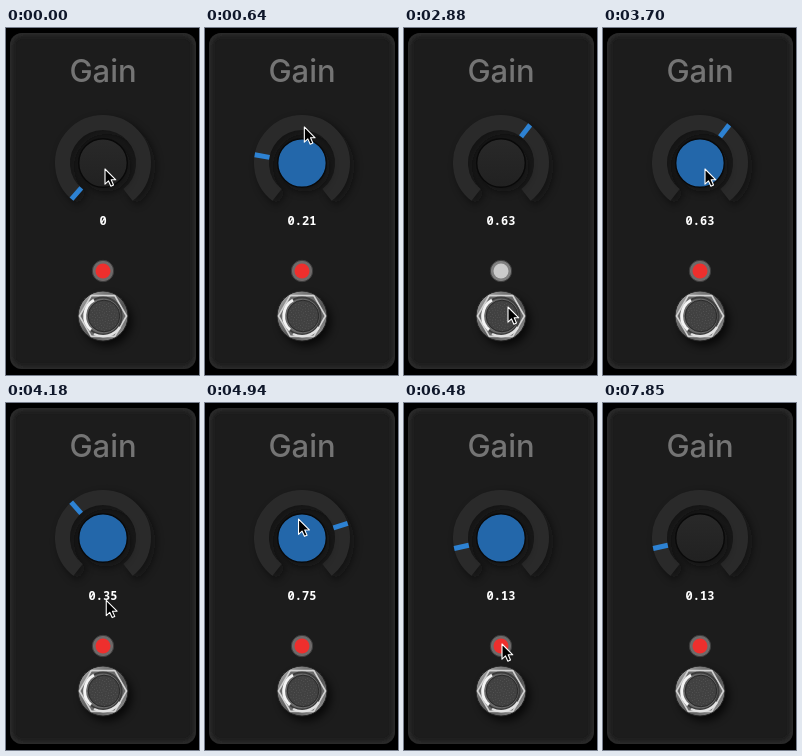
Animation, 193 px wide and 347 px high, one loop 8.36 s. Source, as an HTML page:

```html
<!DOCTYPE html>
<html lang="en">
<head>
<meta charset="utf-8">
<title>Gain pedal</title>
<style>
html, body { margin: 0; width: 100%; height: 100%; overflow: hidden; background: #000; }
svg { display: block; width: 193px; height: 347px; }
text { text-anchor: middle; }
.title { font: 450 31px Inter, sans-serif; fill: #747474; }
.value { font: 600 12px "Noto Sans Mono", monospace; fill: #fff; }
</style>
</head>
<body>
<svg viewBox="0 0 193 347">
  <defs>
    <linearGradient id="cap" x1="0" y1="0" x2="0" y2="1">
      <stop offset="0" stop-color="#292929"/><stop offset="1" stop-color="#212121"/>
    </linearGradient>
    <linearGradient id="metal" x1="0" y1="0" x2="1" y2="1">
      <stop offset="0" stop-color="#bbb"/><stop offset=".3" stop-color="#777"/>
      <stop offset=".6" stop-color="#555"/><stop offset="1" stop-color="#a5a5a5"/>
    </linearGradient>
    <filter id="soft" x="-50%" y="-50%" width="200%" height="200%"><feGaussianBlur stdDeviation="4"/></filter>
    <filter id="edge" x="-10%" y="-10%" width="120%" height="120%"><feGaussianBlur stdDeviation="2"/></filter>
    <filter id="gloss" x="-20%" y="-20%" width="140%" height="140%"><feGaussianBlur stdDeviation=".6"/></filter>
    <clipPath id="panel"><rect x="4" y="5" width="186" height="336" rx="12"/></clipPath>
  </defs>

  <rect width="193" height="347" fill="#000"/>
  <g clip-path="url(#panel)">
    <rect x="4" y="5" width="186" height="336" fill="#1c1c1c"/>
    <rect x="4" y="5" width="186" height="336" rx="12" fill="none" stroke="#2d2d2d" stroke-width="5" filter="url(#edge)"/>
  </g>
  <text class="title" x="97" y="53.7">Gain</text>

  <g transform="translate(97 135)">
    <g fill="none" stroke-width="15">
      <path class="ring" stroke="#0c0c0c" opacity=".6" transform="translate(4 4)" filter="url(#soft)"/>
      <path class="ring" stroke="#2a2a2a"/>
    </g>
    <rect id="mark" x="-2.5" y="33" width="5" height="15" fill="#2d82d3"/>
    <circle cx="3" cy="4" r="25" fill="#080808" opacity=".6" filter="url(#soft)"/>
    <circle id="knob" r="24.3" stroke="#090909" stroke-width="1.4"/>
  </g>
  <text class="value" id="value" x="97" y="196.5"></text>

  <g transform="translate(97 243)">
    <circle id="rim" r="10.7" stroke="#3c3c3c"/>
    <circle id="led" r="7.5"/>
  </g>

  <g transform="translate(97 288)">
    <circle cx="4" cy="5" r="25" fill="#000" opacity=".7" filter="url(#soft)"/>
    <circle r="25" fill="url(#metal)" stroke="#222"/>
    <g fill="none" filter="url(#gloss)">
      <path id="hex" fill="#696969" stroke="#d2d2d2" stroke-width="1.6"/>
      <circle r="18.6" stroke="#3c3c3c" stroke-width="2"/>
      <path d="M-12 14A18.5 18.5 0 0 1-9-16" stroke="#f4f4f4" stroke-width="3"/>
      <path d="M-9 18A20 20 0 0 0 17 11" stroke="#e2e2e2" stroke-width="2.5"/>
    </g>
    <circle cx="1" r="15.8" fill="#414141" stroke="#2a2a2a"/>
    <g id="grain" fill="#707070" opacity=".5"></g>
  </g>

  <path id="cursor" d="M0 0V15.2L3.5 11.9L5.9 17.2L8.5 16L6.2 10.8H10.8Z" fill="#000" stroke="#fff" stroke-width="1.1" stroke-linejoin="round"/>
</svg>
<script>
const LOOP = 8360;
const HOME = { x: 99, y: 141 };
const PEAK = .63;
const $ = id => document.getElementById(id);

// The hand eases to each point in turn and rests in between.
const moves = [
  { from: 250, to: 1260, x: 100, y: 15 },
  { from: 1260, to: 2160, x: 104, y: 279 },
  { from: 3240, to: 3620, x: 102, y: HOME.y },
  { from: 3820, to: 4280, x: 100, y: 205 },
  { from: 4380, to: 5160, x: 92, y: 95 },
  { from: 5220, to: 6440, x: 98, y: 241 },
  { from: 6700, to: 7060, x: 165, y: 215 }
];
const drags = [
  { from: 60, to: 1260, base: 0 },
  { from: 3690, to: 6640, base: PEAK }
];
const lit = t => t < 2450 || t >= 3210;

const ease = u => u * u * (3 - 2 * u);

function handAt(t) {
  let { x, y } = HOME;
  for (const m of moves) {
    const k = ease(Math.min(1, Math.max(0, (t - m.from) / (m.to - m.from))));
    x += (m.x - x) * k;
    y += (m.y - y) * k;
  }
  return { x, y };
}

// Dragging up by 200 px covers the full range.
function valueAt(t) {
  const drag = drags.filter(d => t >= d.from).pop();
  return drag ? drag.base + (HOME.y - handAt(Math.min(t, drag.to)).y) / 200 : 0;
}

function polar(radius, degrees) {
  const a = degrees * Math.PI / 180;
  return `${-radius * Math.sin(a)} ${radius * Math.cos(a)}`;
}

function build() {
  document.querySelectorAll('.ring').forEach(ring =>
    ring.setAttribute('d', `M${polar(40.5, 38)}A40.5 40.5 0 1 1 ${polar(40.5, 322)}`));
  const corners = Array.from({ length: 6 }, (_, i) => polar(23.5, 30 + 60 * i));
  $('hex').setAttribute('d', `M${corners.join('L')}Z`);

  for (let i = 0; i < 90; i++) {
    const dot = document.createElementNS('http://www.w3.org/2000/svg', 'circle');
    const [x, y] = polar(14.5 * Math.sqrt(i / 90), i * 137.5).split(' ');
    dot.setAttribute('cx', +x + 1);
    dot.setAttribute('cy', y);
    dot.setAttribute('r', .5);
    $('grain').append(dot);
  }
}

function draw(t) {
  const value = valueAt(t);
  const held = drags.some(d => t >= d.from && t < d.to);
  $('mark').setAttribute('transform', `rotate(${41 + 280 * value})`);
  $('value').textContent = String(+value.toFixed(2));
  $('knob').setAttribute('fill', held ? '#2367aa' : 'url(#cap)');
  $('rim').setAttribute('fill', lit(t) ? '#6e6a6a' : '#808080');
  $('led').setAttribute('fill', lit(t) ? '#ee2f2d' : '#cbcbcb');

  const { x, y } = handAt(t);
  $('cursor').setAttribute('transform', `translate(${x} ${y})`);
  $('cursor').style.display = t < 7060 ? '' : 'none';
}

build();
const start = performance.now();
function tick() {
  draw((performance.now() - start) % LOOP);
  requestAnimationFrame(tick);
}
tick();
</script>
</body>
</html>
```
